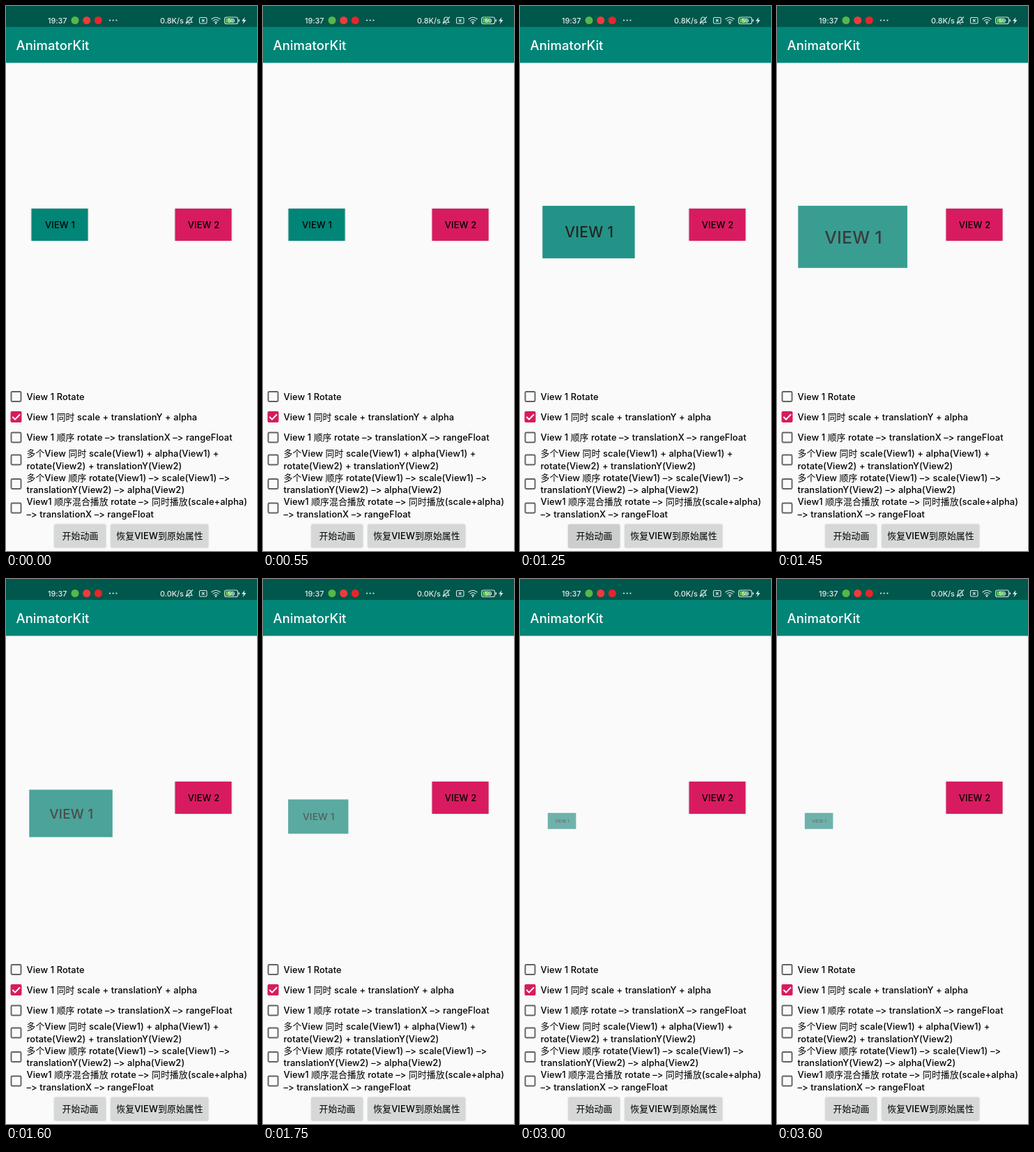
Write an HTML page that moves like this. It is 360 by 780 pixels and loops after 3.8 s.

```html
<!DOCTYPE html>
<html lang="zh-CN">
<head>
<meta charset="utf-8">
<title>AnimatorKit</title>
<style>
  html, body { margin: 0; width: 100%; height: 100%; overflow: hidden; background: #fafafa; }
  svg { display: block; width: 100%; height: 100%; }
  text {
    font: 450 12.83px Inter, "Noto Sans CJK SC", "Noto Sans CJK", sans-serif;
    font-feature-settings: "calt" 0;
    letter-spacing: .1px;
    fill: #000;
  }
  .medium { font-weight: 500; letter-spacing: .15px; }
  .middle { text-anchor: middle; }
  .title { font-size: 18.4px; font-weight: 500; fill: #fff; }
  .status text { font-size: 10.8px; font-weight: 500; letter-spacing: 0; fill: #e3eeec; }
  .status .level { font-size: 8px; font-weight: 700; }
  .line { fill: none; stroke: #d5e5e2; stroke-width: 1.1; }
  .shadow { filter: drop-shadow(0 .8px 1.2px rgba(0, 0, 0, .26)); }
</style>
</head>
<body>
<svg viewBox="0 0 360 780">
  <rect width="360" height="780" fill="#fafafa"/>
  <rect y="30" width="360" height="51.4" fill="#008577"/>
  <rect width="360" height="30" fill="#00574b"/>
  <text class="title" x="14.5" y="63">AnimatorKit</text>

  <g class="status">
    <text x="60" y="24.5">19:37</text>
    <circle cx="99" cy="20.5" r="5.5" fill="#55b848"/>
    <circle cx="115.7" cy="20.5" r="5.5" fill="#ee3b3b"/>
    <circle cx="132.3" cy="20.5" r="5.5" fill="#e5262b"/>
    <g fill="#e3eeec">
      <circle cx="149" cy="20.5" r="1.1"/>
      <circle cx="153.7" cy="20.5" r="1.1"/>
      <circle cx="158.4" cy="20.5" r="1.1"/>
    </g>
    <text id="speed" x="221" y="24.5">0.8K/s</text>
    <path class="line" d="M258.5 23.5h8.5l-1.3-2v-2.5a3 3 0 0 0-6 0v2.5zM261.5 25.5h2.500M268 15.500l-10 10"/>
    <rect class="line" x="277.5" y="16.5" width="10.5" height="8.5" rx="1.5"/>
    <path class="line" d="M281 19l3.5 3.5m0-3.5l-3.5 3.5"/>
    <path class="line" d="M294.5 19q6.5-5.5 13 0M296.7 21.3q4.3-3.6 8.6 0M298.9 23.5q2.1-1.7 4.2 0"/>
    <circle cx="301" cy="25" r="1.1" fill="#e3eeec"/>
    <rect class="line" x="313.5" y="16" width="19" height="9.5" rx="2.8"/>
    <rect x="315" y="17.5" width="10" height="6.5" rx="1.3" fill="#4fc33f"/>
    <rect x="333.5" y="19" width="1.5" height="3.5" rx=".7" fill="#d5e5e2"/>
    <text class="level middle" x="323" y="23.7">59</text>
    <path d="M342.5 16l-4.5 5.5h3l-1.5 4.5 5-6h-3z" fill="#e3eeec"/>
  </g>

  <g id="view1">
    <rect id="view1Shadow" class="shadow" width="81" height="46" fill="#e1e1e1"/>
    <rect width="81" height="46" fill="#e1e1e1"/>
    <g id="view1Face">
      <rect width="81" height="46" fill="#008577"/>
      <text class="medium middle" x="41" y="27.8">VIEW 1</text>
    </g>
  </g>
  <g transform="translate(242.5 290)">
    <rect class="shadow" width="81" height="46" fill="#d81b60"/>
    <text class="medium middle" x="41" y="27.8">VIEW 2</text>
  </g>

  <g id="options"></g>

  <rect id="pressShadow" class="shadow" x="69.5" y="743" width="73.5" height="33" rx="1.5" fill="#b8b8b8"/>
  <rect class="shadow" x="69.5" y="742" width="73.5" height="33" rx="1.5" fill="#d6d7d7"/>
  <rect id="ripple" x="69.5" y="742" width="73.5" height="33" rx="1.5" fill="#b7b8b8"/>
  <text class="medium middle" x="106.5" y="763.3">开始动画</text>
  <rect class="shadow" x="150.5" y="742" width="139.5" height="33" rx="1.5" fill="#d6d7d7"/>
  <text class="medium middle" x="220.5" y="763.3">恢复VIEW到原始属性</text>
</svg>
<script>
const LOOP = 3800, START = 680, DURATION = 1500;
const $ = id => document.getElementById(id);
const clamp = x => Math.min(1, Math.max(0, x));
const ramp = (t, from, to) => clamp((t - from) / (to - from));

const options = [
  [559, 'View 1 Rotate'],
  [588, 'View 1 同时 scale + translationY + alpha'],
  [617.5, 'View 1 顺序 rotate –> translationX –> rangeFloat'],
  [649.5, '多个View 同时 scale(View1) + alpha(View1) +', 'rotate(View2) + translationY(View2)'],
  [684, '多个View 顺序 rotate(View1) –> scale(View1) –>', 'translationY(View2) –> alpha(View2)'],
  [718.5, 'View1 顺序混合播放 rotate –> 同时播放(scale+alpha)', '–> translationX –> rangeFloat'],
];
const emptyBox = '<rect x="7.5" y="-7" width="14" height="14" rx="1.5" fill="none" stroke="#636363" stroke-width="1.9"/>';
const checkedBox = '<rect x="6.5" y="-8" width="16" height="16" rx="2" fill="#d81b60"/>' +
  '<path d="M9.3 0l3.7 3.7 7-7.2" fill="none" stroke="#fff" stroke-width="1.9"/>';

$('options').innerHTML = options.map(([y, ...lines], i) => {
  const labels = lines.map((line, n) =>
    `<text x="29.5" y="${4.6 + (n - (lines.length - 1) / 2) * 17.3}">${line}</text>`);
  return `<g transform="translate(0 ${y})">${i === 1 ? checkedBox : emptyBox}${labels.join('')}</g>`;
}).join('');

function draw(t) {
  // Accelerate-decelerate progress; scale runs 1 -> 2 -> 0.5.
  const p = (1 - Math.cos(Math.PI * ramp(t, START, START + DURATION))) / 2;
  const scale = p < .5 ? 1 + 2 * p : 3.5 - 3 * p;
  const pivotX = 6.67, pivotY = 23;
  $('view1').setAttribute('transform',
    `translate(${36.5 + pivotX} ${290 + pivotY + 33.3 * p}) scale(${scale}) translate(${-pivotX} ${-pivotY})`);
  $('view1Face').setAttribute('opacity', 1 - p / 2);
  $('view1Shadow').setAttribute('opacity', clamp(1 - 3 * p));

  const press = ramp(t, 575, 800) * (1 - ramp(t, 1050, 1350));
  $('ripple').setAttribute('opacity', press);
  $('pressShadow').setAttribute('opacity', press);
  $('speed').textContent = t < 1600 ? '0.8K/s' : '0.0K/s';
}

const begin = performance.now();
function tick() {
  draw((performance.now() - begin) % LOOP);
  requestAnimationFrame(tick);
}
tick();
</script>
</body>
</html>
```
